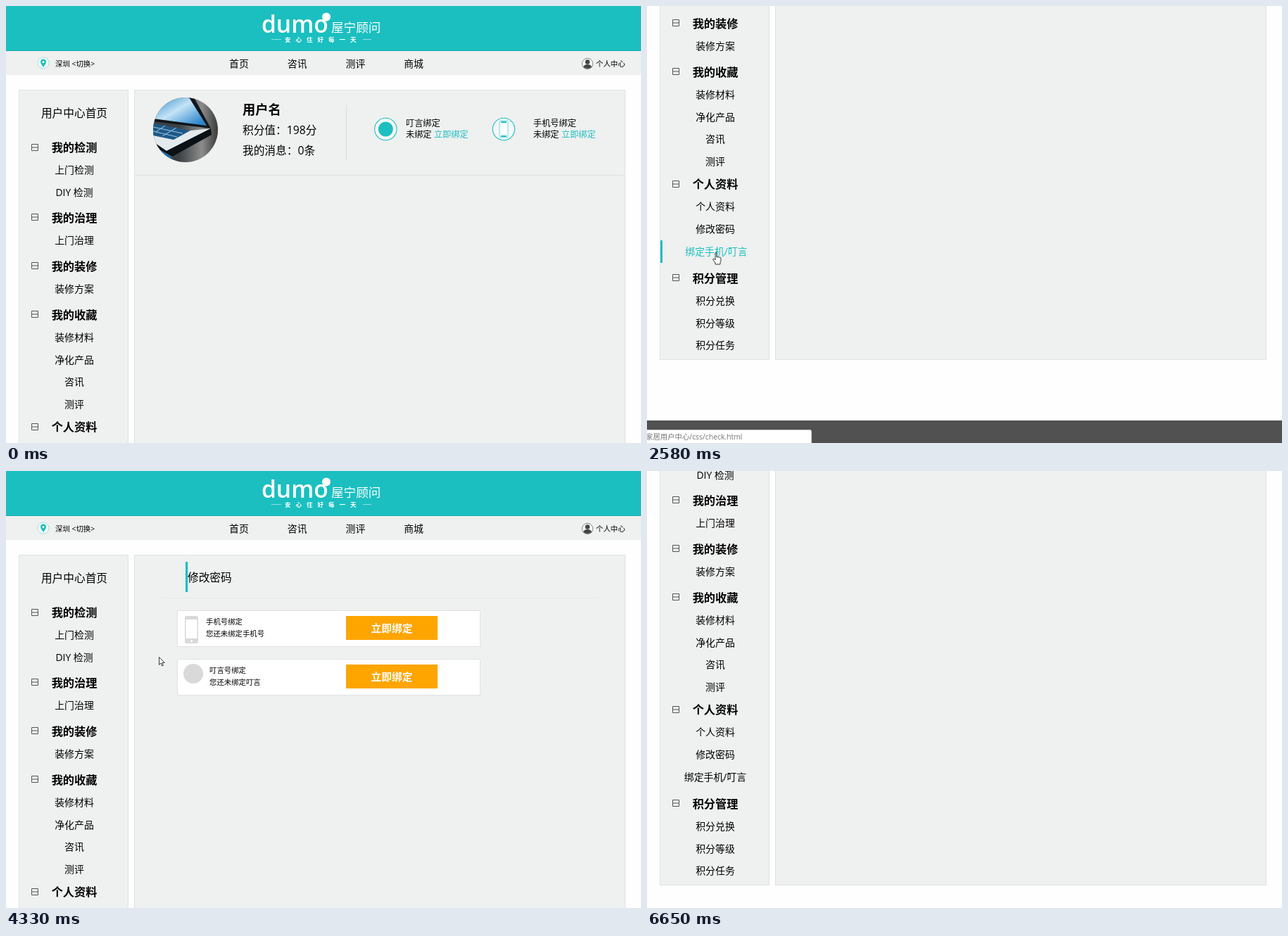
Write an HTML page that moves like this. It is 902 px wide and 621 px high and loops after 8.02 s.

```html
<!DOCTYPE html>
<html lang="zh-CN">
<head>
<meta charset="utf-8">
<title>用户中心</title>
<style>
html, body { margin: 0; width: 100%; height: 100%; overflow: hidden; background: #fefefe; }
svg { display: block; width: 902px; height: 621px; font-family: "Open Sans", "Noto Sans CJK SC", "Noto Sans CJK", sans-serif; }
.colon { font-family: "Noto Sans CJK TC", "Noto Sans CJK", sans-serif; }
.item .mark { visibility: hidden; }
.item.on .mark { visibility: visible; }
.item.on text { fill: #1bbfc0; transform: translateX(1.5px); }
</style>
</head>
<body>
<svg id="stage" viewBox="0 0 902 621"></svg>
<script>
const LOOP = 8020, STEP = 76;
const TEAL = '#1bbfc0', PANEL = '#eff0f0', EDGE = '#e0e2e2';
const SMALL = 10.4, MID = 12.2, BODY = 13.9, LARGE = 15.7;
const BOLD = 'font-weight="700"';

// Text is placed by its vertical centre.
const label = (x, cy, size, str, extra = '') =>
  `<text x="${x}" y="${(cy + size * .37).toFixed(2)}" font-size="${size}" ${extra}>${str}</text>`;
const centred = (x, cy, size, str, extra = '') => label(x, cy, size, str, 'text-anchor="middle" ' + extra);
const rect = (x, y, w, h, fill, extra = '') =>
  `<rect x="${x}" y="${y}" width="${w}" height="${h}" fill="${fill}" ${extra}/>`;
const circle = (x, y, r, fill, extra = '') => `<circle cx="${x}" cy="${y}" r="${r}" fill="${fill}" ${extra}/>`;
const path = (d, fill, extra = '') => `<path d="${d}" fill="${fill}" ${extra}/>`;
const line = (d, color = EDGE) => path(d, 'none', `stroke="${color}"`);

const ROW = 31.7;
const menu = [
  { y: 201.5, title: '我的检测', links: ['上门检测', 'DIY 检测'] },
  { y: 301, title: '我的治理', links: ['上门治理'] },
  { y: 370, title: '我的装修', links: ['装修方案'] },
  { y: 439, title: '我的收藏', links: ['装修材料', '净化产品', '咨讯', '测评'] },
  { y: 598.5, title: '个人资料', links: ['个人资料', '修改密码', '绑定手机/叮言'] },
  { y: 732, title: '积分管理', links: ['积分兑换', '积分等级', '积分任务'] }
];
const hotspots = [];

function menuItem(cy, size, str, top, height, extra = '') {
  hotspots.push({ top, bottom: top + height });
  return `<g class="item"><g class="mark">${rect(19, top, 3, height, TEAL)}${extra}</g>${centred(97, cy, size, str)}</g>`;
}

function menuGroup({ y, title, links }) {
  const rows = links.map((str, i) => {
    const cy = y + ROW * (i + 1);
    return menuItem(cy, BODY, str, Math.round(cy - 16), 32);
  });
  return line(`M36.5 ${Math.round(y) - 5.5}h9v9h-9zm0 4.5h9`, '#555') + centred(97, y, 16.2, title, BOLD) + rows.join('');
}

function sidebar() {
  return rect(18.5, 119.5, 155, 728, PANEL, `stroke="${EDGE}"`) +
    menuItem(152, LARGE, '用户中心首页', 120, 64, line('M19 184.5H173')) + menu.map(menuGroup).join('');
}

function header() {
  const tabs = ['首页', '咨讯', '测评', '商城'].map((s, i) => centred(331 + 82.7 * i, 81.5, BODY, s)).join('');
  return rect(0, 0, 902, 63, TEAL) + rect(0, 63, 902, 1, '#18a8aa') + rect(0, 64, 902, 34, PANEL) +
    `<g fill="#fff">${label(363, 25.5, 33.5, 'dumo', 'font-weight="600"')}${circle(455, 15.5, 6, '#fff')}` +
    label(462, 30, 17.6, '屋宁顾问', 'font-weight="500"') +
    label(396, 47.5, 8.5, '安心住好每一天', BOLD + ' letter-spacing="7"') + '</g>' +
    line('M377 47.5h14M507 47.5h12', '#8fdfe0') +
    circle(53, 81, 8, '#f6fbfb', 'stroke="#a5dfe1"') +
    path('M53 87C50.5 83 49 81.3 49 79.5a4 4 0 0 1 8 0C57 81.3 55.5 83 53 87z', TEAL) + circle(53, 79.5, 1.5, '#fff') +
    label(70, 82.5, SMALL, '深圳 &lt;切换&gt;') + tabs +
    circle(826, 82, 7.7, '#f6f6f6', 'stroke="#888"') + circle(826, 79.5, 3.2, '#444') +
    path('M820 87q1-4 6-4t6 4q-6 4-12 0', '#444') +
    label(838, 82.5, SMALL, '个人中心');
}

function photo() {
  return `<g clip-path="url(#round)">${rect(209, 130, 92, 92, 'url(#desk)')}` +
    path('M209 130H262L288 172 209 162z', 'url(#screen)') +
    path('M260 130h7l24 44-82-10v-4l76 10z', '#10161b') +
    path('M209 167L262 177 238 190 209 184z', '#1d5888') +
    line('M209 172l42 9M209 178l34 8M226 170l-13 9M242 173l-20 12', '#9cc9e6') +
    path('M262 177L291 174 228 206 209 193V184L238 190z', '#e3eaee') +
    path('M209 193L228 206 291 174 292 183 236 214 209 199z', '#0c1116') +
    path('M209 199L236 214 232 222H209z', '#1f6ba6') + '</g>';
}

function binding(x, title) {
  return label(x, 166.5, MID, title) + label(x, 182.5, MID, '未绑定') +
    label(x + 40, 182.5, MID, '立即绑定', `style="fill:${TEAL}"`);
}

function profile() {
  const ring = x => circle(x, 175, 15.7, '#f4f8f8', `stroke="${TEAL}" stroke-width="1.1"`);
  const colon = '<tspan class="colon">：</tspan>';
  return photo() + label(336, 147, 18.2, '用户名', BOLD) +
    label(336, 176, LARGE, `积分值${colon}198分`) + label(336, 205.5, LARGE, `我的消息${colon}0条`) +
    line('M483.5 141V219', '#dadddd') + line('M183 240.5H879') +
    ring(539.3) + circle(539.3, 175, 10.5, TEAL) + binding(568, '叮言绑定') +
    ring(707) + rect(701, 163, 12, 24, '#fff', `rx="2" stroke="${TEAL}" stroke-width=".6"`) +
    rect(703, 164, 8, 2, TEAL) + rect(703, 184, 8, 2, TEAL) + binding(749, '手机号绑定');
}

function card(y, x, title, note, icon) {
  return rect(243.5, y + .5, 430, 51, '#fff', `stroke="${EDGE}"`) + icon +
    label(x, y + 16.5, SMALL, title) + label(x, y + 33.5, SMALL, note) +
    rect(483, y + 8, 130, 34, '#ffa500') +
    centred(548, y + 25.5, 14.7, '立即绑定', BOLD + ' style="fill:#fff"');
}

function bindPage() {
  const phone = rect(254, 206, 19, 39, '#d9d9d9', 'rx="3"') + rect(255.5, 211, 16, 27, '#fff') + circle(263.5, 241.5, 1.6, '#fff');
  return rect(255, 129, 3.2, 43, TEAL) + label(258, 151, LARGE, '修改密码') + line('M222 180.5H840', '#e5e7e7') +
    card(198, 284, '手机号绑定', '您还未绑定手机号', phone) +
    card(267, 289, '叮言号绑定', '您还未绑定叮言', circle(266, 288, 14, '#d9d9d9'));
}

const footer = rect(0, 934, 902, 200, '#515151') +
  label(18, 980, 44, 'dumo', 'font-weight="600" style="fill:#fff"') + circle(124, 967, 8, '#fff');

const stage = document.getElementById('stage');
stage.innerHTML = `<defs>
  <clipPath id="round"><circle cx="255" cy="176" r="46"/></clipPath>
  <linearGradient id="desk"><stop offset=".4" stop-color="#3d4144"/><stop offset=".75" stop-color="#8b8c8b"/><stop offset="1" stop-color="#3a3a39"/></linearGradient>
  <linearGradient id="screen" x2=".9" y2=".8"><stop stop-color="#2c86c8"/><stop offset=".5" stop-color="#c4e4f7"/><stop offset="1" stop-color="#2a86cc"/></linearGradient>
</defs>
<g id="page">${header()}${sidebar()}${rect(182.5, 119.5, 697, 728, PANEL, `stroke="${EDGE}"`)}
  <g id="profile">${profile()}</g><g id="bind">${bindPage()}</g>${footer}</g>
<g id="status">${path('M-2 602.5H231.5q2 0 2 2V623H-2z', '#fff', 'stroke="#cfcfcf"')}
  <text id="link" x="-2" y="616" font-size="${SMALL}" fill="#777"></text></g>
<g id="cursor" stroke="#222" stroke-width=".9" stroke-linejoin="round">
  ${path('M.5.5V11.3L3 9 4.8 13 6.4 12.3 4.7 8.4H8.2z', '#fff', 'id="arrow"')}
  ${path('M-1 1q1-1.5 2 0V7q1-1 2 0 1-1 2 .3 1.2-.8 2 .6V12L6 14.5V17H-1V15L-4.3 10.5q0-2 1.8-1L-1 11z', '#fff', 'id="hand"')}
</g>`;
const el = Object.fromEntries([...stage.querySelectorAll('[id]')].map(n => [n.id, n]));
const items = [...stage.querySelectorAll('.item')];

// Eased 0 to 1, refreshed once per screen step.
function ramp(t, start, duration) {
  const elapsed = Math.floor((t - start) / STEP) * STEP;
  const p = Math.min(1, Math.max(0, elapsed / duration));
  return p * p * (3 - 2 * p);
}

const scrollAt = t => Math.round(345 * (ramp(t, 515, 480) - ramp(t, 2780, 542)) + 259 * ramp(t, 6120, 456));

const moves = [
  { at: 140, takes: 300, x: 695, y: 420 },
  { at: 1245, takes: 457, x: 110, y: 409 },
  { at: 1780, takes: 300, x: 98, y: 350 },
  { at: 2580, takes: 300, x: 333, y: 371 },
  { at: 3890, takes: 760, x: 101, y: 157 },
  { at: 5760, takes: 440, x: 113, y: 446 }
];
function cursorAt(t) {
  let x = 860, y = 500;
  for (const m of moves) {
    const p = ramp(t, m.at, m.takes);
    x += (m.x - x) * p;
    y += (m.y - y) * p;
  }
  return [Math.round(x), Math.round(y)];
}

const statusAt = t => ramp(t, 2174, 150) - ramp(t, 2850, 208) + ramp(t, 4560, 150) - ramp(t, 5744, 150);

const show = (node, on) => node.setAttribute('visibility', on ? 'visible' : 'hidden');

function render(t) {
  const scroll = scrollAt(t);
  const [x, y] = cursorAt(t);
  const pointing = t >= 140 && t < 6650;
  const onBindPage = t >= 2580 && t < 5120;

  el.page.setAttribute('transform', `translate(0 ${-scroll})`);
  show(el.profile, !onBindPage);
  show(el.bind, onBindPage);

  const inMenu = pointing && x > 19 && x < 173;
  const hovered = inMenu ? hotspots.findIndex(h => y + scroll >= h.top && y + scroll < h.bottom) : -1;
  items.forEach((item, i) => item.classList.toggle('on', i === hovered));

  el.cursor.setAttribute('transform', `translate(${x} ${y})`);
  show(el.arrow, pointing && hovered < 0);
  show(el.hand, pointing && hovered >= 0);

  el.status.setAttribute('opacity', statusAt(t));
  el.link.textContent = `家居用户中心/css/${t < 3500 ? 'check' : 'user'}.html`;
}

const start = performance.now();
function frame() {
  render((performance.now() - start) % LOOP);
  requestAnimationFrame(frame);
}
render(0);
requestAnimationFrame(frame);
</script>
</body>
</html>
```
